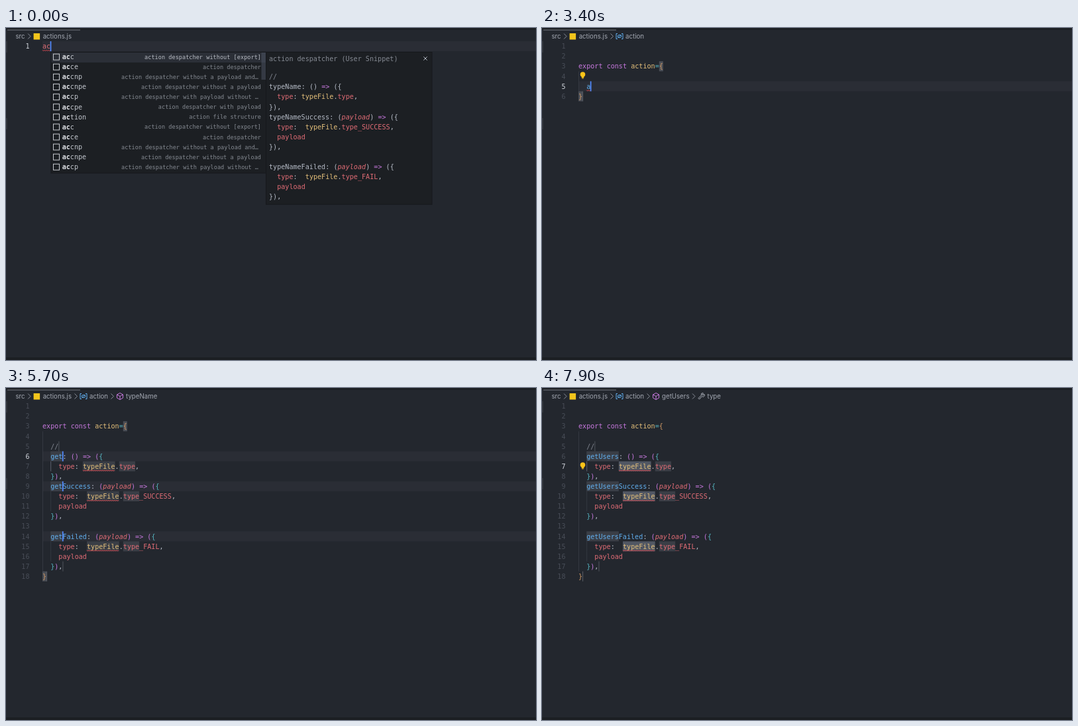
An HTML page with a canvas for the animation above (8000 ms loop, 800 by 501 pixels).

```html
<!DOCTYPE html>
<html lang="en">
<head>
<meta charset="utf-8">
<title>Snippet demo</title>
<style>
  html, body { margin: 0; width: 100%; height: 100%; overflow: hidden; background: #23272e; }
  canvas { display: block; }
</style>
</head>
<body>
<canvas width="800" height="501"></canvas>
<script>
const ctx = document.querySelector('canvas').getContext('2d');
const LOOP = 8000, LEFT = 55, CHAR = 6.09, ROW = 15.1;
const MONO = '"DejaVu Sans Mono", "Liberation Mono", monospace';
const SANS = 'Inter, Roboto, sans-serif';
const C = {
  bg: '#23272e', dark: '#1c1f23', line: '#2a2d35', edge: '#16181c', text: '#b4bac5', dim: '#858a93',
  red: '#e06c75', blue: '#61afef', yellow: '#e5c07b', purple: '#c678dd', cyan: '#56b6c2',
  orange: '#d19a66', cursor: '#528bff', bulb: '#fcc419', stop: '#3a3e46', pick: '#515763'
};

const ABOUT = {
  acc: 'action despatcher without [export]',
  acce: 'action despatcher',
  accnp: 'action despatcher without a payload and…',
  accnpe: 'action despatcher without a payload',
  accp: 'action despatcher with payload without …',
  accpe: 'action despatcher with payload',
  action: 'action file structure'
};

// Value of the last [time, value] step reached
const at = (t, steps) => steps.filter(s => s[0] <= t).pop()[1];
const colX = col => LEFT + col * CHAR;
const lineY = i => 20 + i * ROW;

function rect(x, y, w, h, color) {
  ctx.fillStyle = color;
  ctx.fillRect(x, y, w, h);
}

function text(s, x, y, color, size = 10.1, style = '', font = MONO) {
  ctx.font = `${style} ${size}px ${font}`;
  ctx.fillStyle = color;
  ctx.fillText(s, x, y);
  return x + ctx.measureText(s).width;
}

function stroke(color, width, ...paths) {
  ctx.strokeStyle = color;
  ctx.lineWidth = width;
  ctx.beginPath();
  for (const p of paths) p.forEach(([x, y], i) => i ? ctx.lineTo(x, y) : ctx.moveTo(x, y));
  ctx.stroke();
}

function disc(x, y, r, color) {
  ctx.fillStyle = color;
  ctx.beginPath();
  ctx.arc(x, y, r, 0, 7);
  ctx.fill();
}

// Icons are centred on (x, y)
const icons = {
  box(x, y) {
    ctx.strokeStyle = '#c5c8ce';
    ctx.lineWidth = 1;
    ctx.strokeRect(x - 4.5, y - 4.5, 9, 9);
  },
  cube(x, y, color = C.purple, h = 5) {
    const m = h / 2;
    stroke(color, 1, [[x, y - h], [x + 4.5, y - m], [x + 4.5, y + m], [x, y + h], [x - 4.5, y + m],
      [x - 4.5, y - m], [x, y - h]], [[x - 4.5, y - m], [x, y], [x + 4.5, y - m]], [[x, y], [x, y + h]]);
  },
  white: (x, y) => icons.cube(x, y, '#c5c8ce'),
  flat: (x, y) => icons.cube(x, y, C.blue, 4),
  variable(x, y) {
    const side = d => [[x + d * 3, y - 4], [x + d * 5, y - 4], [x + d * 5, y + 4], [x + d * 3, y + 4]];
    stroke(C.blue, 1, side(-1), side(1), [[x - 2.5, y + 2.5], [x + 2.5, y - 2.5]]);
    ctx.beginPath();
    ctx.ellipse(x, y, 2.8, 2, 0, 0, 7);
    ctx.stroke();
  },
  wrench(x, y) {
    stroke('#b0b5be', 1, [[x - 4.5, y + 3], [x, y - 1.5], [x, y - 4], [x + 2, y - 5], [x + 3, y - 4.5],
      [x + 1.5, y - 2.5], [x + 2.5, y - 1.5], [x + 4.5, y - 3], [x + 5, y - 1], [x + 3, y + 1],
      [x + 1, y], [x - 3, y + 4.5], [x - 4.5, y + 3]]);
  },
  file: (x, y) => rect(x - 5, y - 4.5, 9.5, 9.5, '#f3c51c')
};

function bulb(x, y) {
  disc(x, y - 1, 3.8, C.bulb);
  rect(x - 1.8, y + 1, 3.6, 3, C.bulb);
  rect(x - 1.5, y + 4.4, 3, 1, C.bulb);
}

function squiggle(x, y, w) {
  const points = [];
  for (let d = 0; d <= w; d += 1.5) points.push([x + d, y + (d / 1.5 % 2 ? 1 : -1) * 0.8]);
  stroke('#d0434b', 1, points);
}

function tokenColor(word, src, editing) {
  if (word === '//') return '#7f848e';
  if (/^(=>|export|const)$/.test(word)) return C.purple;
  if (word === 'typeFile') return C.yellow;
  if (/^(payload|type(_\w+)?)$/.test(word)) return C.red;
  if (src.startsWith('export') && word === 'action') return C.yellow;
  if (word === '=') return C.cyan;
  if (!editing) return C.text;
  if (/^[{}]$/.test(word)) return /^}|^export/.test(src) ? C.orange : C.cyan;
  if (/^[()]$/.test(word)) return C.purple;
  if (/^ac/.test(word)) return C.red;
  return /\w/.test(word) ? C.blue : C.text;
}

function code(src, x, y, editing) {
  for (const m of src.matchAll(/\/\/|=>|\w+|\S/g)) {
    const style = m[0] === 'payload' && src[m.index - 1] === '(' ? 'italic' : '';
    text(m[0], x + m.index * CHAR, y, tokenColor(m[0], src, editing), 10.1, style);
  }
}

const FILE = ['', '', 'export const action={', ''];
const creators = name => ['  //', `  ${name}: () => ({`, '    type: typeFile.type,', '  }),',
  `  ${name}Success: (payload) => ({`, '    type:  typeFile.type_SUCCESS,', '    payload', '  }),', '',
  `  ${name}Failed: (payload) => ({`, '    type:  typeFile.type_FAIL,', '    payload', '  }),'];

// Suggestion rows: [icon, label with *matched* parts, description]
const snippets = (typed, names) => names.split(' ').map(n =>
  ['box', n.startsWith(typed) ? `*${typed}*${n.slice(typed.length)}` : n, ABOUT[n]]);
const despatcher = { head: 'action despatcher (User Snippet)', rows: creators('typeName').map(s => s.slice(2)) };
const structure = { head: 'action file structure (User Snippet)', rows: [...FILE, '', '}'] };

const lists = {
  ac: { items: snippets('ac', 'acc acce accnp accnpe accp accpe action acc acce accnp accnpe accp'),
    info: despatcher, bar: 41 },
  acc: { items: snippets('acc', 'acc acc acce accnp accnpe accp accpe acce accnp accnpe accp accpe'),
    info: despatcher, bar: 146 },
  act: {
    items: [
      ['white', '*act*', 'react-dom/test-utils'],
      ['variable', '*act*', '@testing-library/react'],
      ...snippets('act', 'action action'),
      ['variable', '*Act*iveXObject'],
      ['cube', 'get*Act*iveElement', '@testing-library/user-event/dist/u…'],
      ['variable', '*At*omi*c*s'],
      ['flat', '*a*rea*C*urveProp*T*ype', 'nivo/lib/props/curve'],
      ['variable', '*A*bor*tC*ontroller'],
      ['variable', '*A*bstra*ct*Range'],
      ['variable', '*A*udio*C*on*t*ext'],
      ['variable', 'GamepadHaptic*Act*uator']
    ],
    info: { head: 'Add import from "react-dom/test-util…', rows: ['function act(callback: () => Promise…'], plain: true },
    bar: 74
  },
  acti: {
    items: [...snippets('acti', 'action action'), ['variable', '*Acti*veXObject'],
      ['cube', 'get*Acti*veElement', '@testing-library/user-event/dist/u…']],
    info: structure
  },
  actio: { items: snippets('actio', 'action action'), info: structure },
  action: { items: snippets('action', 'action action'), info: structure }
};

function panel(x, y, w, h) {
  rect(x - 0.5, y, w + 1, h, C.edge);
  rect(x + 0.5, y + 1, w - 1, h - 2, C.dark);
}

function popup(x, y, { items, info, bar }) {
  panel(x, y, 324.5, items.length * ROW + 2.3);
  rect(x + 0.5, y + 1, 324, ROW, '#2b2f37');
  items.forEach(([icon, label, about = ''], i) => {
    const base = y + 11 + i * ROW;
    icons[icon](x + 8, base - 3.3);
    let lx = x + 16.7;
    label.split('*').forEach((part, k) => {
      lx = text(part, lx, base, k % 2 ? '#e3e5e9' : '#c3c7ce', 10.1, k % 2 ? 'bold' : '');
    });
    ctx.textAlign = 'right';
    text(about, x + (about.endsWith('…') ? 313 : 317), base - 0.3, i ? '#858a92' : '#b9bdc5', 8.6);
    ctx.textAlign = 'left';
  });
  if (bar) rect(x + 317.5, y + 1, 7, bar, 'rgba(78,86,102,.5)');

  const { head, rows, plain } = info, dx = x + 324.5, tx = x + 329;
  panel(dx, y, 250.5, 49.5 + (rows.length - 1) * ROW + (plain ? 8.5 : 0));
  text(head, tx, y + 14, C.dim);
  rows.forEach((s, i) => plain ? text(s, tx, y + 44, C.dim) : code(s, tx, y + 41.2 + i * ROW));
  const cx = x + 565, cy = y + 10;
  stroke('#b4bac5', 1, [[cx - 2.7, cy - 2.7], [cx + 2.7, cy + 2.7]], [[cx - 2.7, cy + 2.7], [cx + 2.7, cy - 2.7]]);
}

function breadcrumbs(crumbs) {
  let x = text('src', 14.5, 16.2, '#a3a8b2', 9.7, '', SANS);
  for (const [icon, label] of [['file', 'actions.js'], ...crumbs]) {
    stroke('#8b909a', 1, [[x + 4.5, 8.5], [x + 8.5, 12.5], [x + 4.5, 16.5]]);
    icons[icon](x + 18, 12.5);
    x = text(label, x + 27, 16.2, '#a3a8b2', 9.7, '', SANS);
  }
}

const file = ['variable', 'action'];
const CRUMBS = [[0, []], [2200, [file]], [4100, [file, ['wrench', 'acc']]], [4900, [file, ['cube', 'typeName']]],
  [6000, [file, ['cube', 'get']]], [7000, [file, ['cube', 'getUsers']]],
  [7300, [file, ['cube', 'getUsers'], ['wrench', 'type']]]];
const WORD = [[0, 'ac'], [200, 'act'], [1300, 'acti'], [1400, 'actio'], [1500, 'action'],
  [1900, ''], [3400, 'a'], [3700, 'ac'], [4000, 'acc']];
const NAME = [[0, 'typeName'], [5200, 'g'], [5400, 'ge'], [5600, 'get'], [6000, 'getU'],
  [6100, 'getUs'], [6300, 'getUse'], [6400, 'getUser'], [6700, 'getUsers']];
const BULB = [[0, null], [900, [79.5, 26]], [1300, null], [1900, [67.5, 26]], [2200, null],
  [2800, [61.5, 71]], [4500, null], [7600, [61.5, 117]]];

function draw(t) {
  const word = at(t, WORD), name = at(t, NAME);
  const empty = t < 1900, filled = t >= 4500, tabbed = t >= 7200;
  const selecting = filled && (t < 5200 || tabbed);
  const lines = empty ? [word] : [...FILE, ...(filled ? creators(name) : ['  ' + word]), '}'];
  const active = empty ? 0 : !filled ? 4 : tabbed ? 6 : 5;
  const cursors = selecting ? [] : filled ? [5, 8, 13] : [active];
  const cursorX = colX(empty ? word.length : 2 + (filled ? name : word).length);
  const mark = (line, col, n, color) => rect(colX(col), lineY(line), n * CHAR, ROW, color);

  rect(0, 0, 800, 501, C.bg);
  rect(0, 0, 800, 3, C.dark);
  rect(2, 2.5, 110, 1, '#777b82');
  rect(0, 497, 800, 4, C.dark);
  rect(0, 20, 2, 17, '#30343b');
  rect(0, 136, 2, 17, '#30343b');
  breadcrumbs(at(t, CRUMBS));

  for (const i of cursors) rect(LEFT, lineY(i), 800 - LEFT, ROW, C.line);

  if (!empty) {
    const last = lines.length - 1;
    rect(LEFT, lineY(3), 1, (last - 3) * ROW, '#343841');
    rect(colX(1), lineY(last), 1, ROW, '#5b5f67');
    if (t >= 2800 && !selecting) {
      mark(2, 20, 1, '#4a4e56');
      mark(last, 0, 1, '#4a4e56');
    }
  }
  if (filled) {
    for (const i of [9, 10, 14, 15]) rect(colX(2), lineY(i), 1, ROW, '#343841');
    rect(colX(2), lineY(6), 1, ROW, '#5b616c');
    rect(colX(4), lineY(4), 1, ROW, '#50545c');
    rect(colX(5), lineY(16), 1, ROW, '#50545c');
    for (const i of [5, 8, 13]) mark(i, 2, name.length, selecting && !tabbed ? C.pick : C.stop);
    for (const i of [6, 9, 14]) {
      const col = lines[i].indexOf('typeFile');
      mark(i, col, 8, tabbed ? C.pick : C.stop);
      mark(i, col + 9, 4, C.stop);
      squiggle(colX(col), lineY(i) + 14, 8 * CHAR);
    }
  } else if (word) {
    squiggle(colX(empty ? 0 : 2), lineY(active) + 14, word.length * CHAR);
  }

  lines.forEach((s, i) => {
    ctx.textAlign = 'right';
    text(i + 1, 35.5, lineY(i) + 11.2, i === active ? '#d0d4db' : '#484d57');
    ctx.textAlign = 'left';
    code(s, LEFT, lineY(i) + 11.2, true);
  });

  for (const i of cursors) rect(cursorX - 0.5, lineY(i), 1.7, ROW, C.cursor);
  const spot = at(t, BULB);
  if (spot) bulb(...spot);
  if (!filled && lists[word]) popup(Math.round(cursorX + 0.6), empty ? 36 : 96, lists[word]);
}

function frame(now) {
  draw(now % LOOP);
  requestAnimationFrame(frame);
}
requestAnimationFrame(frame);
</script>
</body>
</html>
```
